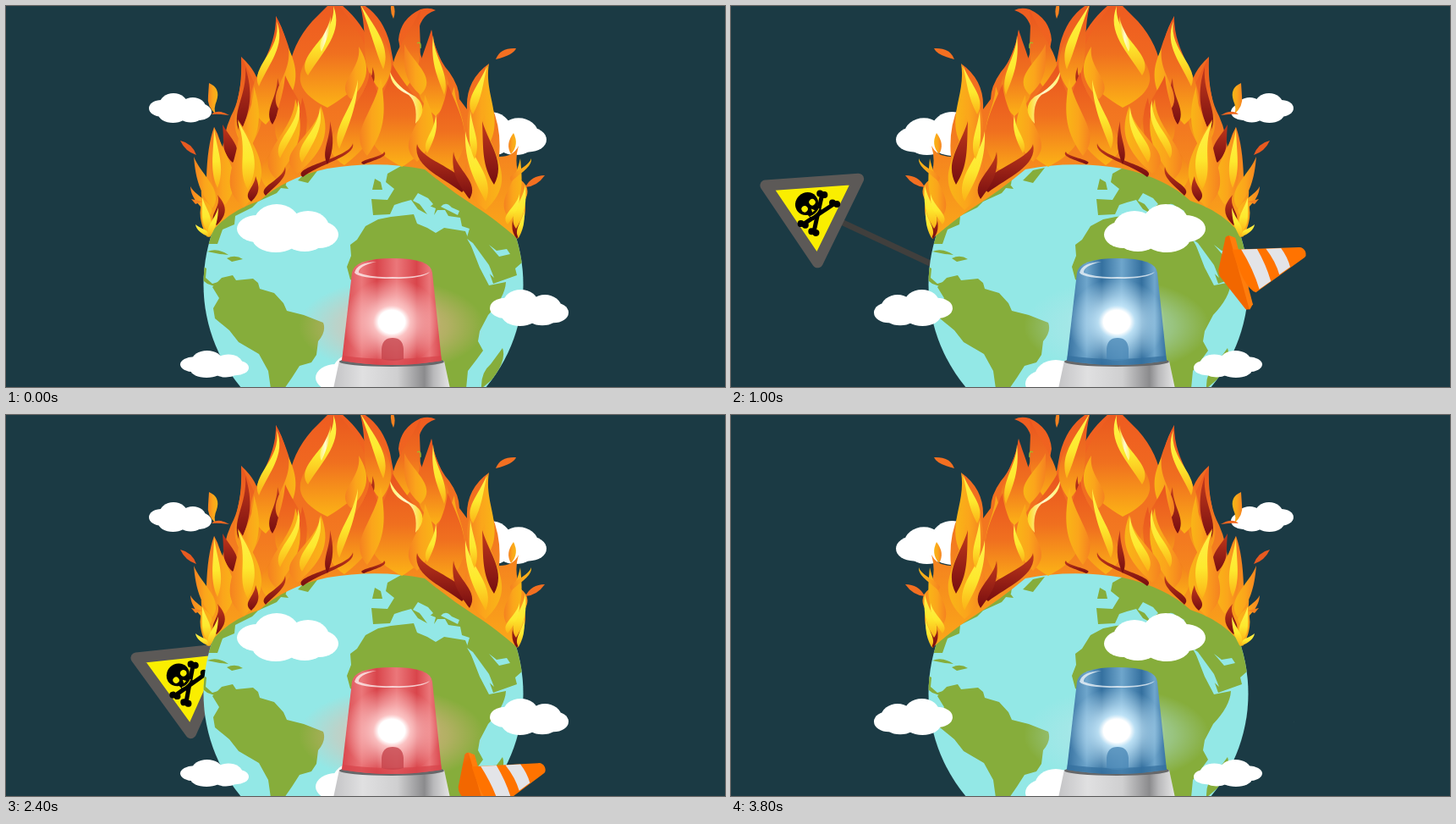
Animation of 850 by 450 pixels, one loop 4 s. Source, as an HTML page:

```html
<!DOCTYPE html>
<html lang="en">
<head>
<meta charset="utf-8">
<title>Burning planet alarm</title>
<style>
html, body { margin: 0; width: 100%; height: 100%; overflow: hidden; background: #1b3a44; }
svg { display: block; width: 850px; height: 450px; }
</style>
</head>
<body>
<svg id="stage" viewBox="0 0 850 450"></svg>
<script>
const path = (d, fill, more = '') => `<path d="${d}" fill="${fill}" ${more}/>`;
const gradient = (id, stops, dir = 'x1="0" y1="0" x2="0" y2="1"', kind = 'linear') =>
  `<${kind}Gradient id="${id}" ${dir}>` + stops.map(([at, colour, alpha = 1]) =>
    `<stop offset="${at}" stop-color="${colour}" stop-opacity="${alpha}"/>`).join('') + `</${kind}Gradient>`;
const ACROSS = 'x1="0" y1="0" x2="1" y2="0"';

// A tongue of fire from a pointed base to a curling tip.
function tongue(tx, ty, bx, by, w, bend, fill) {
  const h = by - ty;
  return path(`M${bx} ${by}C${bx - w * 1.6} ${by - h * .3} ${tx + bend - w * .3} ${ty + h * .45} ${tx} ${ty}` +
    `C${tx + bend + w * .5} ${ty + h * .38} ${bx + w * 1.6} ${by - h * .35} ${bx} ${by}Z`, fill);
}
const tongues = (fill, rows) => rows.map(row => tongue(...row, fill)).join('');

function cloud(x, y, w, h) {
  return `<use href="#cloud" transform="translate(${x} ${y}) scale(${w / 120} ${h / 57})"/>`;
}

const defs = `<defs>
  <g id="cloud" fill="#fff">${[[24, 29, 24, 16], [47, 22, 27, 22], [84, 28, 25, 20], [97, 36, 23, 16],
    [46, 40, 28, 17], [80, 40, 25, 16]].map(([x, y, a, b]) =>
    `<ellipse cx="${x}" cy="${y}" rx="${a}" ry="${b}"/>`).join('')}</g>
  <clipPath id="globe"><circle cx="422.5" cy="329" r="189"/></clipPath>
  ${gradient('body', [[0, '#ee5a20'], [.55, '#f37a20'], [1, '#fba919']])}
  ${gradient('orange', [[0, '#e9541f'], [.5, '#f0701f'], [1, '#fcb316']])}
  ${gradient('amber', [[0, '#f58220'], [.5, '#fba51b'], [1, '#f9b517']], ACROSS)}
  ${gradient('yellow', [[0, '#fff04a'], [.55, '#fde92e'], [1, '#fbb116']])}
  ${gradient('pale', [[0, '#fff36b'], [.5, '#fffbd0'], [1, '#fdd61f']], ACROSS)}
  ${gradient('dark', [[0, '#c33a1c'], [1, '#760d10']])}
  ${gradient('metal', [[0, '#c4c4c6'], [.25, '#e0e0e1'], [.55, '#cfcfd0'], [.78, '#8b8b8d'], [.86, '#b9b9bb'], [1, '#e6e6e6']], ACROSS)}
</defs>`;

const fire =
  path('M238 273Q225 250 232 230Q228 212 237 203Q238 165 246 143Q256 160 255 178Q257 150 266 130Q280 105 278 60Q300 80 299 100Q320 60 319 12Q336 40 334 78Q338 45 362 18Q378 2 388-8Q420 15 432 48Q429 18 418-4Q445 10 454 45L458 66Q470 68 464 40Q466 15 490 4Q500 1 508 5Q486 12 487 40Q489 62 497 70Q502 50 503 28Q508 60 524 78Q536 95 536 110L545 122Q543 88 571 68Q560 92 574 118Q586 145 583 178Q600 178 606 165Q600 185 608 205Q622 215 613 230Q617 245 605 275Q576 250 555 237Q525 218 495 193Q440 182 380 192Q330 203 300 230Q260 243 238 273Z', 'url(#body)') +
  tongues('url(#orange)', [
    [278, 60, 285, 170, 20, 12], [319, 12, 307, 140, 28, 10], [388, -8, 380, 120, 48, 14],
    [418, -4, 443, 100, 18, 18], [503, 28, 508, 130, 23, -8], [490, 4, 470, 100, 19, -14]]) +
  tongues('url(#dark)', [
    [283, 72, 277, 150, 8, 5], [321, 85, 315, 140, 7, 2], [256, 140, 268, 185, 9, 5], [433, 72, 425, 110, 5, 4]]) +
  tongues('url(#amber)', [
    [246, 143, 259, 235, 16, 4], [293, 95, 282, 180, 12, 4], [334, 50, 325, 125, 12, 8],
    [417, 48, 408, 110, 13, 8], [471, 45, 490, 105, 13, 4], [571, 68, 563, 175, 20, -17], [530, 95, 530, 175, 16, -7]]) +
  tongues('url(#yellow)', [
    [387, 0, 357, 82, 11, 7], [320, 18, 299, 95, 7, 8], [419, -2, 446, 75, 6, 15],
    [569, 70, 552, 128, 7, -9], [246, 145, 250, 215, 6, 1], [505, 35, 518, 105, 5, -2]]) +
  tongues('url(#pale)', [[384, 12, 373, 54, 4, -2]]) +
  tongues('url(#orange)', [
    [330, 82, 340, 180, 25, 4], [430, 78, 400, 188, 31, 4], [457, 69, 468, 190, 44, 3],
    [522, 92, 515, 204, 28, 4], [350, 108, 312, 218, 23, 4]]) +
  tongues('url(#amber)', [
    [342, 110, 319, 204, 18, 3], [372, 118, 345, 198, 20, 2], [443, 85, 427, 177, 15, -2],
    [495, 105, 486, 184, 17, 5], [274, 134, 281, 238, 23, 15], [566, 128, 567, 241, 27, -12]]) +
  tongues('url(#dark)', [
    [410, 162, 351, 202, 10, 0], [447, 172, 423, 187, 8, 2], [486, 163, 539, 220, 14, -2], [383, 136, 380, 187, 5, 2],
    [295, 201, 290, 231, 7, 1], [330, 190, 307, 224, 7, 0], [563, 136, 577, 211, 9, 4], [250, 223, 249, 259, 8, 8],
    [529, 172, 548, 228, 8, -1], [603, 235, 604, 275, 6, -2]]) +
  tongues('url(#yellow)', [
    [274, 136, 286, 217, 9, 16], [345, 111, 324, 180, 7, 5], [371, 120, 350, 185, 8, 1], [416, 87, 394, 169, 7, -4],
    [543, 148, 567, 231, 8, 1], [549, 124, 554, 181, 5, 0], [508, 128, 498, 174, 5, 1]]) +
  path('M454 78Q454 95 476 105Q487 115 484 139Q501 121 484 107Q462 96 454 78Z', 'url(#pale)') +
  tongues('url(#amber)', [
    [222, 178, 244, 239, 9, 5], [218, 213, 241, 247, 7, 3], [608, 180, 595, 251, 11, -3], [621, 180, 598, 207, 6, -2]]) +
  tongues('url(#yellow)', [
    [224, 258, 240, 273, 6, 3], [232, 226, 239, 268, 6, 2], [251, 238, 241, 273, 5, -3],
    [614, 211, 603, 263, 7, -2], [607, 222, 593, 258, 6, -2], [613, 241, 606, 274, 4, -2]]) +
  // loose sparks
  path('M240 91Q254 97 249 112Q245 121 248 128Q237 118 239 106Z', 'url(#amber)') +
  path('M243 128Q251 121 264 129Q249 127 243 128Z', '#ef6721') +
  path('M579 63Q584 49 603 50Q600 58 579 63Z', '#f36f21') +
  path('M456-5Q462 4 458 15Q453 6 456-5Z', '#f58220') +
  path('M206 159Q220 162 225 176Q212 172 206 159Z', '#e85a20') +
  path('M637 200Q621 200 614 214Q628 213 637 200Z', '#f36f21') +
  path('M600 150Q607 164 597 175Q590 163 600 150Z', 'url(#amber)') +
  path('M219 228L232 231L224 234Z', '#f58220') +
  path('M486 44Q491 41 490 50', 'none', 'stroke="#a5b529" stroke-width="1.3"');

const land = [
  'M230 281L250 281L256 264L270 258L271 248L291 238L298 231L320 221L325 215L334 216L328 208L350 190L240 190Z',
  'M319 209L332 204L331 211L320 214Z M345 206L357 194L371 191L357 209Z',
  'M238 290Q250 285 263 294L253 293Z M261 298Q271 293 280 299L267 302Z',
  'M230 306L237 310L236 321L244 328L254 325L249 332L238 328L230 322Z',
  'M244 332L255 321L268 318L272 324L292 322L298 327L300 334L317 339L328 351L332 360L352 365L375 374Q379 384 369 396L367 412L361 421L347 425L338 439L329 452L313 452L310 431L299 411L275 397L264 383L247 369L245 357L252 345Z',
  // Africa
  'M407 323L403 308L408 295L407 282L415 276L425 260L440 252L455 249L482 246L486 257L498 262L508 268L518 262L543 266L551 286L560 309L571 330L591 326Q590 344 570 365L560 384L558 396L564 407L556 418L546 431L544 452L502 452L481 392L465 356L430 336Z',
  // Europe, Asia and Arabia
  'M434 247L432 228L451 229L459 216L449 208L451 198L467 189L500 180L570 210L625 280L610 303L602 310L604 318L576 328L570 311L555 289L545 273L548 263L539 260L537 250L523 248L519 241L510 241L506 247L508 239L498 235L492 229L489 234L498 246L487 240L479 229L468 232L459 235L454 246Z',
  'M433 217L436 204L443 208L445 217Z',
  'M587 404Q592 418 576 440L562 452Q561 433 573 423Z'
].map(d => path(d, '#86ad3b')).join('') +
  ['M481 230L487 221L499 227L505 234L499 239Z', 'M514 237Q520 230 527 238L536 242L534 247Z',
   'M571 282L580 289L592 287L596 293L583 296Z', 'M545 275L552 280L571 306L577 321L568 313Z']
    .map(d => path(d, '#93e8e6')).join('');

const earth = `<g clip-path="url(#globe)"><rect x="230" y="130" width="390" height="330" fill="#93e8e6"/>${land}</g>`;

function siren(id, edge, mid, glow, bulb, halo) {
  return `<g id="${id}">
  ${gradient(id + 'Glass', [[0, edge], [.2, mid], [.35, edge], [.55, mid], [.75, edge], [.88, mid], [1, edge]], ACROSS)}
  ${gradient(id + 'Halo', [[0, halo, .8], [.6, halo, .4], [1, halo, 0]], '', 'radial')}
  ${gradient(id + 'Light', [[0, '#fff'], [.27, '#fff'], [.38, glow, .85], [.62, glow, .5], [1, glow, 0]], '', 'radial')}
  <ellipse cx="456" cy="378" rx="110" ry="55" fill="url(#${id}Halo)"/>
  ${path('M387 452L394 419H518L525 452Z', 'url(#metal)')}
  <ellipse cx="456" cy="420" rx="62" ry="6" fill="#66686a"/>
  ${path('M397 419L409 315Q412 298 457 298Q502 298 504 315L515 419Q456 429 397 419Z', `url(#${id}Glass)`)}
  <ellipse cx="456" cy="373" rx="58" ry="51" fill="url(#${id}Light)"/>
  ${path('M397 419L398 413Q456 421 514 413L515 419Q456 429 397 419Z', edge, 'opacity=".75"')}
  ${path('M444 417V405Q445 392 457 392Q469 392 470 405V417Q457 421 444 417Z', bulb, 'opacity=".8"')}
  ${path('M412 315Q415 303 438 302Q416 307 417 315Q430 321 457 320Q488 321 501 314Q494 322 457 322Q417 322 412 315Z', '#fff', 'opacity=".7"')}
  </g>`;
}

const bone = (x1, y1, x2, y2) => `<path d="M${x1} ${y1}L${x2} ${y2}" stroke="#000" stroke-width="5"/>` +
  [[x1, y1], [x2, y2]].map(([x, y]) =>
    `<circle cx="${x - 2.5}" cy="${y - 1}" r="4"/><circle cx="${x + 2.5}" cy="${y + 1}" r="4"/>`).join('');

const sign = `<g id="sign">
  <path d="M20 11L150 83" stroke="#403f3d" stroke-width="7"/>
  <path d="M-55-32L55-32L0 63Z" fill="#faee00" stroke="#5c5957" stroke-width="13" stroke-linejoin="round"/>
  ${bone(11, -17, -2, 27)}${bone(25, -5, -14, 17)}
  <g transform="translate(-8 -7) rotate(-38)">
    <ellipse rx="14" ry="13"/><rect x="-8" y="6" width="16" height="14" rx="3"/>
    <g fill="#faee00"><circle cx="-6" cy="3" r="3.7"/><circle cx="6" cy="3" r="3.7"/><path d="M0 8L2 12H-2Z"/></g>
    <path d="M-7 14Q0 17 7 14" stroke="#faee00" fill="none"/>
  </g></g>`;

const band = (a, b) => {
  const edge = x => 5 - x * .31;
  return path(`M${a} ${-edge(a)}L${b} ${-edge(b)}Q${b + 4} 0 ${b + 3} ${edge(b) - 1}L${a + 5} ${edge(a) - 2}Q${a + 6} 0 ${a} ${-edge(a)}Z`, '#e3e4e8');
};
const cone = `<g id="cone">
  ${path('M-83-46Q-79-49-75-44L-80 39Q-82 45-88 42L-104-4Q-105-8-103-13Z', '#f26700')}
  ${path('M-78-47L-72-42L-78 39L-84 44Z', '#ff7d0c')}
  ${path('M-80-30L-5-7Q0-6 1 0Q1 6-3 7L-70 27Q-82 18-80-30Z', '#ff7300')}
  ${band(-70, -52)}${band(-42, -25)}
  </g>`;

const backClouds = cloud(169, 103, 74, 35) + cloud(529, 125, 110, 52);
const frontClouds = cloud(273, 234, 120, 57) + cloud(366, 410, 120, 57) + cloud(572, 335, 93, 43) + cloud(206, 407, 81, 32);

const stage = document.getElementById('stage');
stage.innerHTML = defs + `<rect width="850" height="450" fill="#1b3a44"/>
  <g class="clouds">${backClouds}</g>${sign}${earth}
  <g class="clouds">${frontClouds}</g>${cone}<g id="fire">${fire}</g>` +
  siren('red', '#d9454b', '#eb777a', '#ffd3d3', '#c6444b', '#f5b4a0') +
  siren('blue', '#34709f', '#6fa6cc', '#cdeeff', '#4a87b5', '#b5e6e8');

// Poses by step: x, y, angle
const rest = { sign: [111, 233, 5], cone: [677, 272, -20] };
const poses = {
  sign: { 3: [182, 274, -7.5], 4: [143, 259, -7.5], 5: [98, 240, -4], 10: [126, 270, -6], 11: [155, 284, -6], 12: [212, 313, -6] },
  cone: { 3: [668, 357, -17], 4: [679, 318, -17], 5: [678, 290, -19], 10: [677, 322, -18.5], 11: [664, 360, -19], 12: [636, 416, -20] }
};

const find = id => document.getElementById(id);
const show = (el, on) => el.setAttribute('display', on ? 'inline' : 'none');
const flip = (el, sum, on) => el.setAttribute('transform', on ? `matrix(-1 0 0 1 ${sum} 0)` : '');

function draw(time) {
  const step = Math.floor(time % 4000 / 200);
  const odd = step % 2 === 1;
  stage.querySelectorAll('.clouds').forEach(el => flip(el, 834, odd));
  flip(find('fire'), 843, odd);
  show(find('red'), !odd);
  show(find('blue'), odd);
  for (const id in poses) {
    const [x, y, angle] = poses[id][step] || rest[id];
    find(id).setAttribute('transform', `translate(${x} ${y}) rotate(${angle})`);
    show(find(id), step >= 3 && step <= 12);
  }
}

const start = performance.now();
function tick() {
  draw(performance.now() - start);
  requestAnimationFrame(tick);
}
tick();
</script>
</body>
</html>
```
